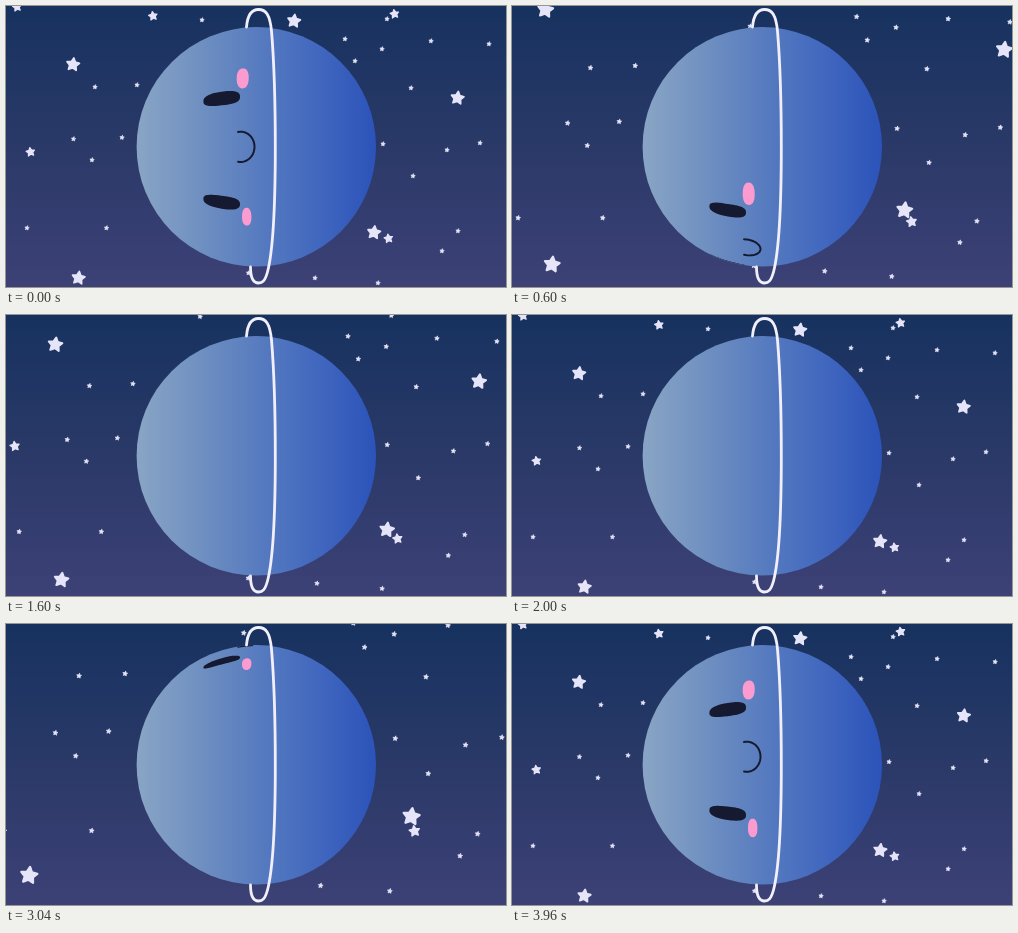
Recreate the animation shown at these times as an HTML page with a canvas. Size 500 px wide and 281 px high, loop 4 s.

```html
<!DOCTYPE html>
<html lang="en">
<head>
<meta charset="utf-8">
<title>Rolling planet</title>
<style>
  html, body { margin: 0; width: 100%; height: 100%; overflow: hidden; background: #2b3a69; }
  canvas { display: block; width: 100vw; height: 100vh; }
</style>
</head>
<body>
<canvas id="stage" width="500" height="281"></canvas>
<script>
const W = 500, H = 281, LOOP = 4000, STEP = 40;
const canvas = document.getElementById('stage');
const ctx = canvas.getContext('2d');
const INK = '#161a30', PINK = '#fb9bd0', RING = '#f1effc', STAR = '#e5e4f8';
const CX = 250.3, CY = 140.8, R = 119.7;
const SPIN = 0.0978 * Math.PI / 180; // radians per ms
const RAD = Math.PI / 180;

// Each star layer zooms about its own fixed point; nearer layers grow more.
const layers = [
  { zoom: 0.0985, x: 252, y: 378, r: 2.6, tilt: 0.15, stars: [
    [196, 14], [339, 33], [376, 43], [349, 55], [381, 13], [425, 35], [483, 38],
    [405, 82], [377, 138], [474, 137], [441, 144], [407, 170], [452, 225],
    [436, 245], [309, 272], [372, 277], [100.5, 222], [86, 154], [67.5, 133],
    [21, 222], [89, 81], [131, 79], [116, 131.5], [242.5, 267], [239, 42]] },
  { zoom: 0.2, x: 252, y: 360, r: 5, tilt: -0.15, stars: [
    [382.5, 232.5], [24.5, 146], [388.5, 8], [147, 10], [11, 1]] },
  { zoom: 0.295, x: 241, y: 342, r: 7.3, tilt: 0.13, stars: [
    [67, 58.5], [72.5, 272], [368, 226.5], [451.5, 92], [288, 15]] }
];

function gradient(x0, y0, x1, y1, stops) {
  const g = ctx.createLinearGradient(x0, y0, x1, y1);
  stops.forEach(([at, color]) => g.addColorStop(at, color));
  return g;
}

const sky = gradient(0, 0, 0, H, [[0, '#17325f'], [0.5, '#2a3968'], [1, '#3d4176']]);
const skin = gradient(CX - R, 0, CX + R, 0,
  [[0, '#89a5c5'], [0.25, '#7191c1'], [0.5, '#587cbf'], [0.75, '#4268bf'], [1, '#2b53b9']]);
const ring = new Path2D('M240.5 21 C241.5 9 246 3.5 252.5 3.5 C260 3.5 264 9 265.5 25 ' +
  'C268 55 269.3 100 269.3 141 C269.3 195 267 245 261.5 266 ' +
  'C259 275 256.5 277 252.5 277 C247 277 244.5 270 244.5 261');

function drawStar(x, y, r, tilt) {
  ctx.beginPath();
  for (let i = 0; i < 10; i++) {
    const a = tilt - Math.PI / 2 + i * Math.PI / 5;
    const d = r * (i % 2 ? 0.46 : 0.9);
    ctx.lineTo(x + d * Math.cos(a), y + d * Math.sin(a));
  }
  ctx.closePath();
  ctx.lineWidth = r * 0.24;
  ctx.fill();
  ctx.stroke();
}

function drawStars(t) {
  const p = (1 - Math.cos(2 * Math.PI * t / 2000)) / 2;
  ctx.fillStyle = ctx.strokeStyle = STAR;
  for (const l of layers) {
    const s = 1 + l.zoom * p;
    for (const [x, y] of l.stars) {
      drawStar(l.x + (x - l.x) * s, l.y + (y - l.y) * s, l.r * s, l.tilt);
    }
  }
}

// Places a point on the sphere: x stays, the angle turns about the horizontal axis.
function onSphere(x, angle) {
  const dx = x - CX;
  return [x, CY + Math.sqrt(R * R - dx * dx) * Math.sin(angle)];
}

function blob(x, angle, w, h, power, color) {
  if (Math.cos(angle) < 0) return;
  const bend = v => Math.sign(v) * Math.abs(v) ** (2 / power);
  const limit = Math.PI / 2;
  ctx.beginPath();
  for (let i = 0; i < 60; i++) {
    const a = i * Math.PI / 30;
    const turn = angle + bend(Math.sin(a)) * h / R;
    ctx.lineTo(...onSphere(x + bend(Math.cos(a)) * w, Math.max(-limit, Math.min(limit, turn))));
  }
  ctx.closePath();
  ctx.fillStyle = color;
  ctx.fill();
}

function smile(angle) {
  ctx.beginPath();
  for (let i = 0; i <= 30; i++) {
    const a = (i / 30 - 0.5) * 200 * RAD;
    const turn = angle + Math.sin(a) * 15.3 / R;
    if (Math.abs(turn) < Math.PI / 2) {
      ctx.lineTo(...onSphere(234.5 + 14 * Math.cos(a), turn));
    }
  }
  ctx.lineWidth = 2;
  ctx.strokeStyle = INK;
  ctx.stroke();
}

function drawPlanet(t) {
  const turn = (t > LOOP / 2 ? t - LOOP : t) * SPIN;
  ctx.save();
  ctx.beginPath();
  ctx.arc(CX, CY, R, 0, 2 * Math.PI);
  ctx.fillStyle = skin;
  ctx.fill();
  ctx.clip();
  blob(215.7, turn - 25 * RAD, 18.3, 7.9, 2.7, INK);
  blob(215.7, turn + 29 * RAD, 18.3, 7.7, 2.7, INK);
  blob(236.7, turn - 35.3 * RAD, 6, 12.3, 2.3, PINK);
  blob(240.7, turn + 36 * RAD, 4.7, 11, 2.3, PINK);
  smile(turn);
  ctx.restore();
}

function draw(t) {
  ctx.fillStyle = sky;
  ctx.fillRect(0, 0, W, H);
  ctx.lineJoin = ctx.lineCap = 'round';
  drawStars(t);
  drawPlanet(t);
  ctx.strokeStyle = RING;
  ctx.lineWidth = 2.8;
  ctx.stroke(ring);
}

const start = performance.now();
function frame() {
  const t = (performance.now() - start) % LOOP;
  draw(Math.floor(t / STEP) * STEP);
  requestAnimationFrame(frame);
}
frame();
</script>
</body>
</html>
```
